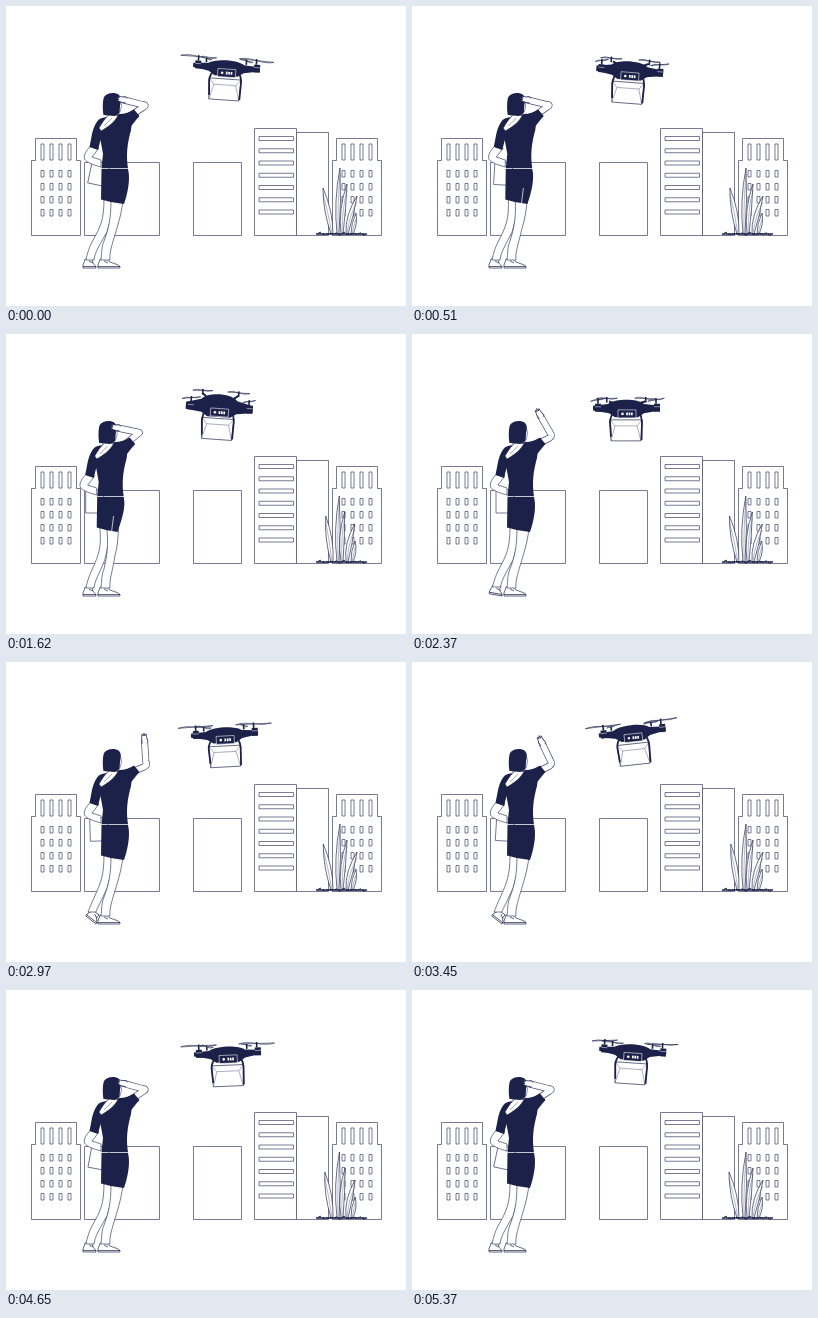
Write an HTML page with a canvas that moves like this. It is 400 px wide and 300 px high and loops after 5.4 s.

```html
<!DOCTYPE html>
<html lang="en">
<head>
<meta charset="utf-8">
<title>Drone delivery</title>
<style>
html, body { margin: 0; width: 100%; height: 100%; overflow: hidden; background: #fff; }
canvas { display: block; width: 400px; height: 300px; }
</style>
</head>
<body>
<canvas id="stage" width="400" height="300"></canvas>
<script>
const LOOP = 5400, NAVY = '#1b2148', LINE = '#4a4f73', WHITE = '#fff';
const canvas = document.getElementById('stage');
const ctx = canvas.getContext('2d');
const dpr = Math.max(1, window.devicePixelRatio || 1);
canvas.width = 400 * dpr;
canvas.height = 300 * dpr;

// Keys are [time, ...values]; the last key closes the loop.
const droneKeys = [
  [0, 220, 62, 4, 0], [930, 215, 66, 4, .8], [1620, 213, 70, 4, 1],
  [2370, 214, 74, 0, .25], [2970, 218, 73, -3, 0], [3930, 221, 68.5, -8, 0],
  [4700, 221, 64, -2, 0], [5400, 220, 62, 4, 0]
];
const armKeys = [
  [0, 139.5, 100, 118, 94], [1650, 138, 99, 116, 94], [2300, 139.5, 103, 128, 82],
  [2490, 139.5, 103, 129, 81], [2970, 140, 104, 138.5, 79], [3450, 139.5, 103, 130, 81],
  [3930, 140, 104, 138.5, 79], [4080, 140, 104, 138.5, 79], [4700, 139.5, 100, 118, 94],
  [5400, 139.5, 100, 118, 94]
];
const leanKeys = [[0, 0], [930, -3], [1620, -4.3], [2370, 0], [5400, 0]];
const heelKeys = [[0, 0], [2100, 0], [2900, 1], [4000, 1], [4700, 0], [5400, 0]];
const folderKeys = [[0, 12], [930, -3], [1620, 0], [2370, 0], [2970, -2], [3930, 9], [5400, 12]];
const swayKeys = [[0, 0], [600, 0], [1400, -2.5], [2850, 0], [3450, 0], [4400, -2.5], [5170, 0], [5400, 0]];

function segment(keys, t) {
  let i = 0;
  while (i < keys.length - 2 && t >= keys[i + 1][0]) i++;
  return [i, (t - keys[i][0]) / (keys[i + 1][0] - keys[i][0])];
}

function ease(keys, t) {
  const [i, u] = segment(keys, t), s = u * u * (3 - 2 * u);
  return keys[i].slice(1).map((v, k) => v + (keys[i + 1][k + 1] - v) * s);
}

// Smooth curve through the keys, continuous across the loop point.
function glide(keys, t) {
  const n = keys.length - 1, [i, u] = segment(keys, t);
  const slope = (j, k) => {
    const a = keys[(j + n - 1) % n], b = keys[j % n + 1];
    const span = ((b[0] - a[0]) % LOOP + LOOP) % LOOP;
    return (b[k] - a[k]) / span;
  };
  const h = keys[i + 1][0] - keys[i][0], u2 = u * u, u3 = u2 * u;
  return keys[i].slice(1).map((v, j) => {
    const k = j + 1;
    return (2 * u3 - 3 * u2 + 1) * v + (u3 - 2 * u2 + u) * h * slope(i, k) +
      (3 * u2 - 2 * u3) * keys[i + 1][k] + (u3 - u2) * h * slope(i + 1, k);
  });
}

function paint(path, fill, stroke = LINE, width = .75) {
  const p = typeof path === 'string' ? new Path2D(path) : path;
  if (fill) { ctx.fillStyle = fill; ctx.fill(p); }
  if (stroke) { ctx.strokeStyle = stroke; ctx.lineWidth = width; ctx.stroke(p); }
}

function box(x, y, w, h, fill = WHITE, stroke = LINE, width = .75) {
  const p = new Path2D();
  p.rect(x, y, w, h);
  paint(p, fill, stroke, width);
}

function placed(x, y, angle, draw) {
  ctx.save();
  ctx.translate(x, y);
  ctx.rotate(angle * Math.PI / 180);
  draw();
  ctx.restore();
}

function tower(x) {
  paint(`M${x} 229.5V154.5H${x + 4}V132.5H${x + 45}V154.5H${x + 49}V229.5Z`, WHITE);
  for (let c = 0; c < 4; c++) {
    const wx = x + 9.5 + c * 9;
    box(wx, 138, 3, 16);
    for (let r = 0; r < 4; r++) box(wx, 164.5 + r * 13, 3, 6.5);
  }
}

function city() {
  tower(25.5);
  box(78.5, 156.5, 75, 73);
  box(187.5, 156.5, 48, 73);
  box(290.5, 126.5, 32, 103);
  box(248.5, 122.5, 42, 107);
  for (let r = 0; r < 7; r++) box(253, 130.5 + r * 12.25, 34.5, 4);
  tower(326.5);
}

function leaf(x, tipX, tipY, w, bend) {
  const my = (228 + tipY) / 2, mx = (x + tipX) / 2 + bend;
  paint(`M${x} 228Q${mx - w} ${my} ${tipX} ${tipY}Q${mx + w} ${my} ${x + 2} 228Z`, WHITE, NAVY, .65);
  paint(`M${x + 1} 228Q${mx} ${my} ${tipX} ${tipY + 6}`, null, LINE, .4);
}

function plant(t) {
  const [s] = ease(swayKeys, t);
  const s1 = 1.5 - 1.5 * Math.cos(t / LOOP * 4 * Math.PI);
  leaf(331, 334 + s * .3, 162, 4, -1);
  leaf(335, 341 + s, 178, 4, -2);
  leaf(340, 351 + s, 190, 4.5, -2);
  leaf(325, 317 + s1, 182, 5, 1);
  leaf(345, 350 + s * .4, 207, 3.5, 1);
  paint('M310 228H361', null, NAVY, 1.6);
  for (let i = 0; i < 12; i++) {
    const x = 312 + i * 4;
    paint(`M${x} ${227.2 + i % 3 * .6}l3 ${i % 2 ? 1 : -1}`, null, NAVY, 1);
  }
}

function shoe(x, y, len, angle) {
  placed(x, y, angle, () => {
    paint(`M${-len} 0C${-len - 1} -4 ${-len + 2} -6 ${-len + 2} -9H${-len + 10}` +
      `C${-len + 9} -5 -3 -5 0 -1.5V0Z`, WHITE, NAVY, .7);
    paint(`M${-len} -1.5H0`, null, NAVY, .7);
    paint(`M${-len + 6} -7l4 2`, null, NAVY, .7);
  });
}

function legs(dx, heel) {
  const X = v => v + dx, K = v => v + dx * .5;
  const lift = heel * 4, push = heel * 2;
  shoe(90, 262, 13, heel * 38);
  paint(`M${X(98)} 192C${K(98)} 214 ${K(95)} 220 ${86 + push} 236` +
    `C${83 + push} 242 ${81 + push} 248 ${80 + push} ${254 - lift}` +
    `H${88 + push}C${89 + push} 246 ${93 + push} 240 ${K(101)} 226L${X(110)} 194`, WHITE);
  shoe(114, 262, 22, 0);
  paint(`M${X(105)} 194C${K(105)} 212 ${K(103)} 222 98 235C95 242 96 248 95 254` +
    `H104C103 246 107 236 ${K(111)} 222C${K(114)} 212 ${X(116)} 204 ${X(117)} 194`, WHITE);
}

function raisedArm(ex, ey, hx, hy) {
  const arm = new Path2D(`M121 112L${ex - 2} ${ey + 1}Q${ex + 1.5} ${ey - 1} ${ex - (ex - hx) * .12} ${ey - (ey - hy) * .2}L${hx} ${hy}`);
  const turn = Math.atan2(hy - ey, hx - ex) * 180 / Math.PI;
  ctx.lineCap = ctx.lineJoin = 'round';
  paint(arm, null, LINE, 7);
  paint(arm, null, WHITE, 5.6);
  placed(hx, hy, turn, () => {
    paint('M-2 -2.4L2 -2.8L7 -2.2L5 -1L8 0L5 .6L7 2L2 2.6L-1 3.6L-2 2.4', WHITE, NAVY, .7);
  });
  ctx.lineCap = 'butt';
  paint('M113 108C119 108 124 106 128 103.5L133.5 110C129 115 125 120 121 126L112 122Z', NAVY, null);
}

function woman(t) {
  const [dx] = ease(leanKeys, t), [heel] = ease(heelKeys, t);
  const [tilt] = ease(folderKeys, t), arm = ease(armKeys, t);
  legs(dx, heel);
  ctx.save();
  ctx.translate(dx, 0);
  placed(93, 167, tilt, () => box(-9, -11, 18, 23));
  paint('M84.5 140C80 145 77.5 149 78.5 153C81 157 88 159 95 161V154L86 151L93 142Z', WHITE);

  // skirt and top
  const hip = dx * .5;
  paint(`M95.5 163L122 163C124.5 173 ${122 + hip} 186 ${118 + hip} 198Q106 197 95 193.5Z`, NAVY, null);
  if (dx < -.5) paint(`M${112 + hip} 198L${114 + hip} 182`, null, WHITE, .7);
  paint('M96 112C91 113 88 120 86 128L83.5 141L92 144L94.5 134L97 148L95.5 162.3H122' +
    'C120 150 121 138 125 124C127 116 122 109 114 108Z', NAVY, null);

  // neck and hood
  paint('M101 103H112V109Q107 114 101 112Z', WHITE, LINE, .6);
  paint('M93 122C96 117 99 112 103 109L112 109.5C109 116 102 121 95 125Z', WHITE, NAVY, .6);
  paint('M98 120L106 112', null, LINE, .5);

  // head
  paint('M112 92Q116 95 115.5 100L114 106L110 107Z', WHITE, LINE, .6);
  paint('M97.5 109C96.5 103 96.5 95 98 91C101 86.5 109 86 113 89C116 92 114.5 96 114 100L113.5 107Q110 111 105 109.5Z', NAVY, null);
  raisedArm(...arm);
  ctx.restore();
}

function prop(x, y, spin, scale) {
  const len = (6 + 12 * Math.abs(Math.cos(spin))) * scale;
  const rise = Math.sin(spin) * 1.6 * scale;
  paint(`M${x} ${y}Q${x - len * .6} ${y - 2.2 - rise} ${x - len} ${y - rise}L${x} ${y}` +
    `Q${x + len * .6} ${y + 2 + rise} ${x + len} ${y + rise}Z`, WHITE, NAVY, .6);
  paint(`M${x} ${y - 1.5}V${y + 4}`, null, NAVY, 1.6);
}

function drone(t) {
  const [x, y, tilt, p] = glide(droneKeys, t);
  const spin = t / LOOP * 2 * Math.PI * 29;
  placed(x, y, tilt, () => {
    const front = -9.5 + 5 * p, rear = -8.5 - 4 * p, drop = 3.5 * p;
    prop(-20 + 3 * p, rear, spin + 1.3, .62);
    prop(20 - p, rear, spin + 1.9, .62);
    if (p > .05) paint(`M-17 ${rear + 3}L-10 -4M19 ${rear + 3}L11 -4`, null, NAVY, 2);

    // parcel
    const b = 11 + drop;
    paint(`M-16 ${b}H16L15 ${b + 21}H-15Z`, WHITE, NAVY, .65);
    paint(`M-16 ${b}L-11 ${b + 6}H11L16 ${b}M-11 ${b + 6}L-15 ${b + 21}M11 ${b + 6}L15 ${b + 21}`, null, LINE, .45);
    paint(`M-12 4Q-15.5 ${7 + drop} -16 ${13 + drop}L-15 ${28 + drop}` +
      `M13 4Q15.5 ${7 + drop} 16 ${13 + drop}L15.5 ${31 + drop}`, null, NAVY, 1.8);

    // body
    const end = -3 + 3 * p, under = 8 + 5 * p, top = -9 - 2.5 * p;
    paint(`M-33 ${end}L-18 -4C-11 ${top} 12 ${top} 18 -4L34 ${end}V${end + 4 + 3 * p}` +
      `L18 ${4 + 5 * p}L12 ${under}H-11L-17 ${4 + 5 * p}L-33 ${end + 4 + 3 * p}Z`, NAVY, null);
    for (const mx of [-28, 31]) {
      box(mx - 3, front + 4, 6, 8, NAVY, null);
      paint(`M${mx - 3} ${front + 7}h6`, null, WHITE, .5);
    }
    prop(-28, front, spin, 1);
    prop(30, front, spin + .3, 1);

    // camera panel
    const c = 5 + drop;
    box(-8, c - 4, 18, 8, NAVY, WHITE, .55);
    ctx.fillStyle = WHITE;
    ctx.beginPath();
    ctx.arc(-3.5, c, 1.3, 0, 7);
    ctx.fill();
    for (let i = 0; i < 3; i++) ctx.fillRect(.2 + i * 2.4, c - 1.4, 1.7, 2.8);
  });
}

function frame(now) {
  const t = now % LOOP;
  ctx.setTransform(dpr, 0, 0, dpr, 0, 0);
  ctx.fillStyle = WHITE;
  ctx.fillRect(0, 0, 400, 300);
  city();
  plant(t);
  woman(t);
  drone(t);
}

const start = performance.now();
function loop() {
  frame(performance.now() - start);
  requestAnimationFrame(loop);
}
loop();
</script>
</body>
</html>
```
